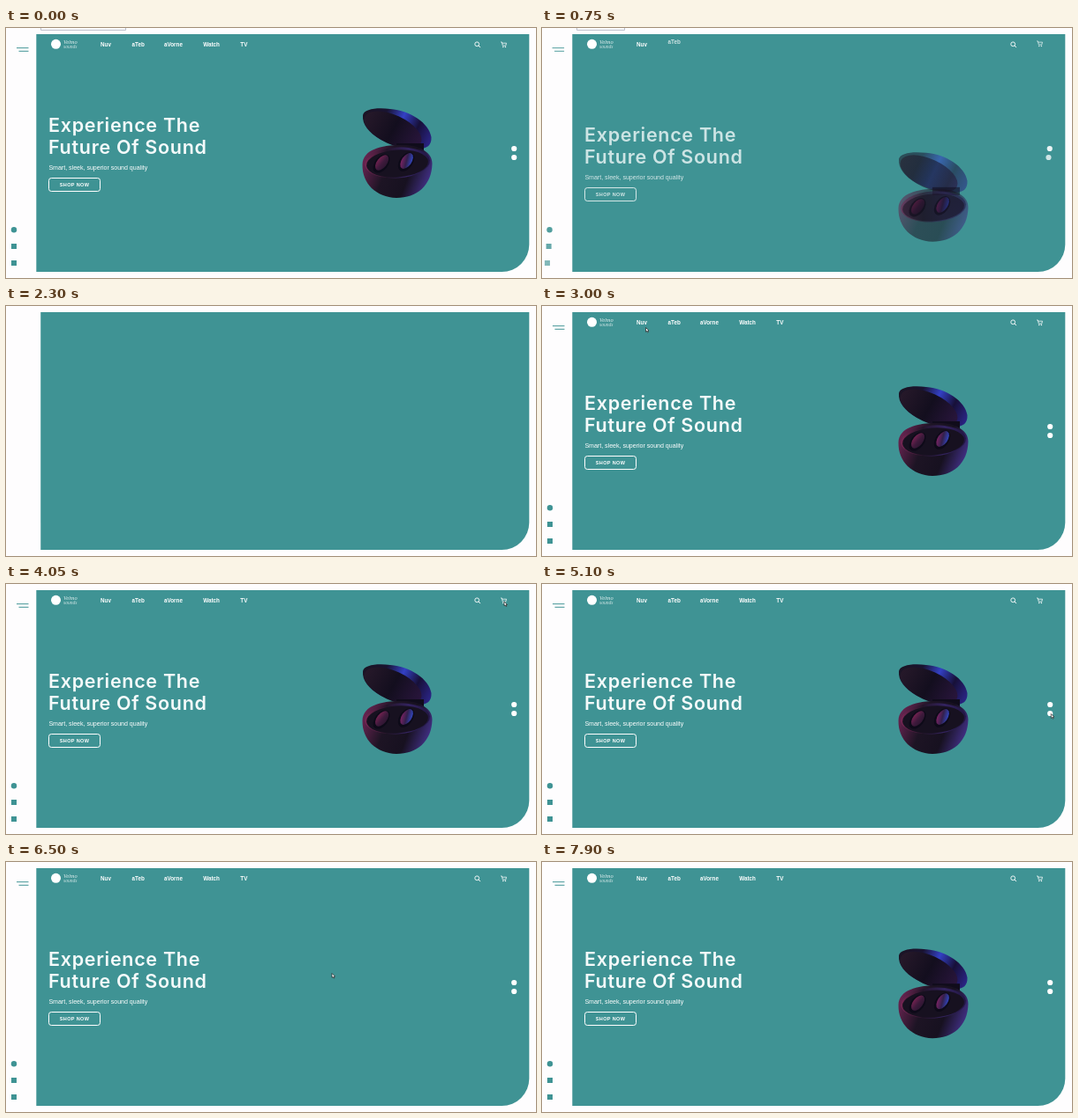
Animation of 600x284 px, one loop 7.95 s. Source, as an HTML page with a canvas:

```html
<!DOCTYPE html>
<html lang="en">
<head>
<meta charset="utf-8">
<title>Sound landing page</title>
<style>
html, body { margin: 0; width: 100%; height: 100%; overflow: hidden; background: #fefdfe; }
canvas { display: block; width: 100vw; height: 100vh; }
</style>
</head>
<body>
<canvas id="stage" aria-label="Experience The Future Of Sound"></canvas>
<script>
const W = 600, H = 284, LOOP = 7950;
const TEAL = '#3f9394', WHITE = '#fff', PAPER = '#fefdfe';
const SANS = '"Liberation Sans", Arial, sans-serif';
const canvas = document.getElementById('stage');
const ctx = canvas.getContext('2d');
const dpr = window.devicePixelRatio || 1;
canvas.width = W * dpr;
canvas.height = H * dpr;

const clamp = v => Math.max(0, Math.min(1, v));
const span = (t, start, dur) => clamp((t - start) / dur);
const easeOut = p => 1 - (1 - p) ** 3;
const easeInOut = p => p * p * (3 - 2 * p);

// Draw a part shifted by (dx, dy) that settles while it fades in.
function reveal(t, start, dur, dx, dy, draw) {
  const p = span(t, start, dur);
  if (p <= 0) return;
  const left = 1 - easeOut(p);
  ctx.save();
  ctx.globalAlpha *= 1 - (1 - p) ** 2;
  ctx.translate(dx * left, dy * left);
  draw();
  ctx.restore();
}

function text(str, x, y, font, color = WHITE, spacing = 0) {
  ctx.font = font;
  ctx.letterSpacing = spacing + 'px';
  ctx.fillStyle = color;
  ctx.fillText(str, x, y);
}

function oval(x, y, rx, ry, deg, fill) {
  ctx.beginPath();
  ctx.ellipse(x, y, rx, ry, deg * Math.PI / 180, 0, Math.PI * 2);
  ctx.fillStyle = fill;
  ctx.fill();
}

function line(points, color, width) {
  ctx.beginPath();
  points.forEach(([x, y], i) => i ? ctx.lineTo(x, y) : ctx.moveTo(x, y));
  ctx.strokeStyle = color;
  ctx.lineWidth = width;
  ctx.stroke();
}

function gradient(x0, y0, x1, y1, colors) {
  const g = ctx.createLinearGradient(x0, y0, x1, y1);
  colors.forEach((c, i) => g.addColorStop(i / (colors.length - 1), c));
  return g;
}

function panel(left) {
  ctx.beginPath();
  ctx.roundRect(left, 7, 592.3 - left, 270, [0, 0, 31, 0]);
  ctx.fillStyle = TEAL;
  ctx.fill();
}

function logo() {
  oval(56.5, 18.3, 5.5, 5.5, 0, WHITE);
  text('Velmo', 65, 18, 'italic 6.4px "Liberation Serif", serif', '#e3f0f0');
  text('sounds', 65, 23.4, 'italic 5.6px "Liberation Serif", serif', '#cfe4e4');
}

function menu() {
  line([[12, 22.7], [25.5, 22.7]], TEAL, 1);
  line([[14.5, 26.3], [25.5, 26.3]], TEAL, 1);
}

function search() {
  ctx.beginPath();
  ctx.arc(533.2, 18.3, 2.4, 0, Math.PI * 2);
  ctx.strokeStyle = WHITE;
  ctx.lineWidth = 0.9;
  ctx.stroke();
  line([[535, 20.1], [537, 22.1]], WHITE, 1);
}

function cart() {
  line([[560, 16], [561.4, 16], [562.3, 20], [565.8, 20], [566.5, 17.2], [561.8, 17.2]], WHITE, 0.75);
  oval(562.8, 21.5, 0.7, 0.7, 0, WHITE);
  oval(565.4, 21.5, 0.7, 0.7, 0, WHITE);
}

function headline() {
  const font = '600 21.5px Inter, sans-serif';
  text('Experience The', 48, 118.3, font, '#f4fafa', 0.7);
  text('Future Of Sound', 48, 142.6, font, '#f4fafa', 0.7);
  text('Smart, sleek, superior sound quality', 48.4, 161, '7.04px ' + SANS);
}

function button() {
  ctx.beginPath();
  ctx.roundRect(48.5, 170.5, 58, 15, 2.8);
  ctx.strokeStyle = WHITE;
  ctx.lineWidth = 1;
  ctx.stroke();
  text('SHOP NOW', 60.8, 180, 'bold 5.5px ' + SANS, WHITE, 0.36);
}

function bud(x, y, deg, fill) {
  oval(x, y, 7.5, 12, deg, '#0d0a18');
  oval(x + 0.6, y - 1, 5.6, 10, deg, fill);
}

function earbuds() {
  // Lid
  ctx.beginPath();
  ctx.moveTo(404, 99);
  ctx.bezierCurveTo(405, 92, 420, 90, 435, 92);
  ctx.bezierCurveTo(458, 94, 479, 108, 481.5, 124);
  ctx.bezierCurveTo(482, 134, 476, 138, 464, 137);
  ctx.bezierCurveTo(437, 136, 402, 121, 404, 99);
  ctx.fillStyle = gradient(410, 92, 482, 126, ['#1b1426', '#191330', '#3340c4', '#171038', '#2a2484']);
  ctx.fill();
  oval(438, 115.5, 35, 16.5, 25, gradient(408, 102, 466, 134, ['#251829', '#130e1e', '#28153b']));

  // Hinge and bowl
  ctx.fillStyle = '#100c1b';
  ctx.fillRect(442, 131, 31, 9);
  ctx.beginPath();
  ctx.moveTo(403.5, 155);
  ctx.bezierCurveTo(404, 138, 425, 133, 446, 133);
  ctx.bezierCurveTo(467, 132, 483, 141, 482.5, 154);
  ctx.bezierCurveTo(482, 179, 465, 193, 442, 193);
  ctx.bezierCurveTo(419, 192, 403, 177, 403.5, 155);
  ctx.fillStyle = gradient(406, 150, 480, 178, ['#63234e', '#1d1424', '#171120', '#45328d']);
  ctx.fill();
  oval(443, 153, 37, 17.5, -4, gradient(407, 150, 480, 150, ['#742652', '#24152a', '#33235f', '#211642']));
  oval(443, 154, 35, 15.5, -4, '#171120');

  bud(425, 154, 38, gradient(417, 147, 434, 161, ['#9b285f', '#3e1a3c', '#1c1225']));
  bud(453, 152, 34, gradient(445, 151, 461, 155, ['#91246a', '#33204c', '#3151e0']));
}

function arrow(x, y) {
  ctx.save();
  ctx.translate(x, y);
  ctx.beginPath();
  ctx.moveTo(0, 0);
  [[0, 4.8], [1.1, 3.9], [2, 5.6], [2.8, 5.2], [2, 3.6], [3.5, 3.5]].forEach(p => ctx.lineTo(...p));
  ctx.closePath();
  ctx.fillStyle = WHITE;
  ctx.strokeStyle = '#222';
  ctx.lineWidth = 0.7;
  ctx.fill();
  ctx.stroke();
  ctx.restore();
}

// Pointer stops: time, x, y.
const route = [
  [2800, 100, -8], [3000, 117.5, 24.5], [3150, 117.5, 24.5], [3500, 268, 22],
  [3850, 564, 20], [4300, 564, 20], [4700, 584, 100], [5050, 576.3, 147.5],
  [5350, 576.3, 147.5], [6150, 369, 126.5], [6750, 369, 126.5], [7150, 210, -8]
];

function pointer(t) {
  const i = route.findIndex(stop => stop[0] > t);
  if (i < 1) return;
  const [t0, x0, y0] = route[i - 1], [t1, x1, y1] = route[i];
  const p = easeInOut((t - t0) / (t1 - t0));
  arrow(x0 + (x1 - x0) * p, y0 + (y1 - y0) * p);
}

function product(t, r) {
  ctx.save();
  ctx.beginPath();
  ctx.rect(34, 7, 558, 270);
  ctx.clip();
  if (t < 5300) {
    reveal(r, 160, 500, 0, 160, earbuds);
  } else if (t < 6400) {
    const p = easeInOut(span(t, 5300, 800));
    ctx.globalAlpha = 1 - p;
    ctx.translate(0, -190 * p);
    if (p < 1) earbuds();
  } else {
    ctx.translate(0, 7.2);
    reveal(t, 6510, 590, 0, 80, earbuds);
  }
  ctx.restore();
}

function tooltip(t) {
  if (t >= 1000) return;
  const right = t < 400 ? 135.5 : 93.5;
  line([[39.5, 0], [39.5, 2.4], [right, 2.4], [right, 0]], '#b4b8c4', 0.9);
}

// Time since the page content began to appear.
function sinceLoad(t) {
  if (t < 150) return LOOP;
  return t < 1700 ? t - 430 : t - 2300;
}

const links = [['Nuv', 107], ['aTeb', 142.6], ['aVorne', 179], ['Watch', 223.3], ['TV', 265.3]];

function draw(t) {
  const r = sinceLoad(t);
  ctx.setTransform(canvas.width / W, 0, 0, canvas.height / H, 0, 0);
  ctx.fillStyle = PAPER;
  ctx.fillRect(0, 0, W, H);
  panel(39.3 - 5 * easeOut(span(r, 0, 200)));
  tooltip(t);

  reveal(r, 140, 260, -14, 0, menu);
  reveal(r, 100, 200, 0, -20, logo);
  links.forEach(([label, x], i) =>
    reveal(r, 182 + i * 75, 130, 0, -26, () => text(label, x, 21, 'bold 6.3px ' + SANS)));
  reveal(r, 120, 200, 0, -20, search);
  reveal(r, 190, 210, 0, -20, cart);

  reveal(r, 80, 450, 0, 110, headline);
  reveal(r, 80, 450, 0, 110, button);
  product(t, r);

  [137, 147].forEach((y, i) =>
    reveal(r, 150 + i * 45, 250, -14, 0, () => oval(575.2, y, 3.1, 3.1, 0, WHITE)));

  reveal(r, 150, 250, -14, 0, () => oval(9, 229.2, 3.2, 3.2, 0, TEAL));
  [248, 267].forEach((y, i) => reveal(r, 185 + i * 35, 250, -14, 0, () => {
    ctx.fillStyle = TEAL;
    ctx.fillRect(6, y - 3, 6, 6);
  }));

  pointer(t);
}

const began = performance.now();
function tick() {
  draw((performance.now() - began) % LOOP);
  requestAnimationFrame(tick);
}
tick();
</script>
</body>
</html>
```
